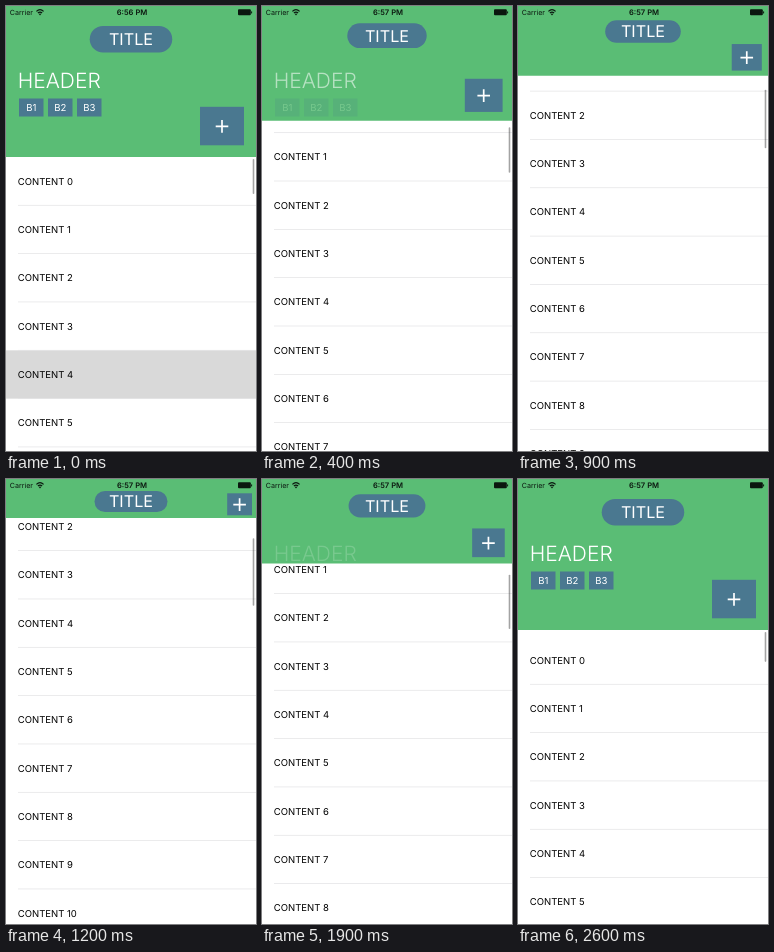
These frames come from a looping animation (250 by 445 pixels, 2700 ms). An HTML page:

```html
<!DOCTYPE html>
<html lang="en">
<head>
<meta charset="utf-8">
<title>Collapsing header</title>
<style>
  html, body { margin: 0; width: 100%; height: 100%; overflow: hidden; background: #fff; }
  svg { display: block; }
  text { font-family: Inter, Roboto, sans-serif; text-rendering: geometricPrecision; }
  .mid { text-anchor: middle; }
  .light { fill: #fff; }
  .blue { fill: #4a7890; }
  .row { font-size: 9.5px; }
  .line { fill: #e2e2e4; }
</style>
</head>
<body>
<svg width="250" height="445" viewBox="0 0 250 445">
  <rect width="250" height="445" fill="#fff"/>
  <g id="rows"></g>
  <rect id="bar" x="246.7" width="1.6" rx=".8" fill="#000" fill-opacity=".36"/>
  <svg id="head" width="250" height="151">
    <rect width="250" height="151" fill="#5abd75"/>
    <text id="header" class="light" x="11.7" y="82.2" font-size="21" font-weight="350">HEADER</text>
    <g id="tabs"></g>
    <rect id="pill" class="blue"/>
    <text id="title" class="light mid" x="125" font-size="16.2">TITLE</text>
    <rect id="add" class="blue"/>
    <path id="plus" d="M-6.3 0H6.3M0-6.3V6.3" stroke="#fff" stroke-width="1.7"/>
  </svg>
  <g id="status" fill="#0b170f">
    <text x="3.8" y="9" font-size="7.1">Carrier</text>
    <g fill="none" stroke="#0b170f" stroke-width="1.2">
      <path d="M30.4 5.4Q34 2 37.6 5.4M31.9 7Q34 5.1 36.1 7"/>
    </g>
    <path d="M32.8 8.1Q34 7.1 35.2 8.1L34 9.4Z"/>
    <text id="clock" class="mid" x="126" y="9.1" font-size="7.6" font-weight="600">6:56 PM</text>
    <rect x="232" y="3.3" width="12.8" height="6" rx="1"/>
    <rect x="245.1" y="5.2" width="1" height="2.2" rx=".5"/>
  </g>
</svg>
<script>
const LOOP = 2700, STEP = 100;
const ROW = 48.33, TOP = 151, TRAVEL = 224;

// [time in ms, scroll offset in px]
const drag = [[0, 0], [400, 72.6], [900, 162.5], [1200, 224.3], [1350, 239],
              [1900, 133], [2300, 51.5], [2600, -6]];

const $ = id => document.getElementById(id);
const mix = (a, b, p) => a + (b - a) * p;
const clamp = v => Math.min(1, Math.max(0, v));

function set(el, attrs) {
  for (const k in attrs) el.setAttribute(k, attrs[k]);
  return el;
}

function add(parent, tag, attrs, text = '') {
  const el = set(document.createElementNS('http://www.w3.org/2000/svg', tag), attrs);
  el.textContent = text;
  return parent.appendChild(el);
}

const pressed = add($('rows'), 'rect', { y: 4 * ROW, width: 250, height: ROW, fill: '#d9d9d9' });
for (let i = 0; i < 14; i++) {
  add($('rows'), 'text', { class: 'row', x: 11.8, y: (i + .5) * ROW + 3.5 }, 'CONTENT ' + i);
  add($('rows'), 'rect', { class: 'line', x: 12, y: (i + 1) * ROW - .4, width: 238, height: .7 });
}
for (let i = 0; i < 3; i++) {
  const x = 13 + i * 29;
  add($('tabs'), 'rect', { class: 'blue', x, y: 92.5, width: 24.5, height: 18 });
  add($('tabs'), 'text', { class: 'light mid', x: x + 12.25, y: 105, 'font-size': 9.6 }, 'B' + (i + 1));
}

const slope = (a, b) => (b[1] - a[1]) / (b[0] - a[0]);

function tangent(i) {
  const last = drag.length - 1;
  if (i === 0) return slope(drag[0], drag[1]);
  if (i === last) return slope(drag[last - 1], drag[last]);
  const a = slope(drag[i - 1], drag[i]), b = slope(drag[i], drag[i + 1]);
  return a * b > 0 ? (a + b) / 2 : 0;
}

// Cubic Hermite curve through the drag points
function scrollAt(t) {
  let i = 0;
  while (i < drag.length - 2 && t > drag[i + 1][0]) i++;
  const [t0, a] = drag[i], [t1, b] = drag[i + 1];
  const d = t1 - t0, u = (t - t0) / d, v = 1 - u;
  return v * v * (1 + 2 * u) * a + u * u * (3 - 2 * u) * b
       + u * v * d * (v * tangent(i) - u * tangent(i + 1));
}

function draw(t) {
  const s = scrollAt(t), p = clamp(s / TRAVEL), down = Math.max(0, s);
  const h = TOP - p * TRAVEL / 2;

  set($('rows'), { transform: `translate(0 ${TOP - s})` });
  set(pressed, { visibility: t < STEP ? 'visible' : 'hidden' });
  set($('head'), { height: h });
  set($('header'), { opacity: clamp(1 - s / 163) });
  set($('tabs'), { opacity: clamp(1 - s / 87) });

  const pw = mix(82.5, 73, p), ph = mix(26.5, 21, p), cy = mix(33.2, 22.5, p);
  set($('pill'), { x: 125 - pw / 2, y: cy - ph / 2, width: pw, height: ph, rx: ph / 2 });
  set($('title'), { y: cy + 5.9 });

  const w = mix(44, 24.8, p), bh = mix(38.5, 22, p);
  const x = 250 - mix(12, 4, p) - w, y = h - mix(11.7, 2.7, p) - bh;
  set($('add'), { x, y, width: w, height: bh });
  set($('plus'), { transform: `translate(${x + w / 2} ${y + bh / 2 + .3})` });

  set($('bar'), {
    y: h + 2 + .052 * down + .00013 * down * down,
    height: 35 + (s < 0 ? .85 : .145) * s
  });
  $('clock').textContent = t < STEP ? '6:56 PM' : '6:57 PM';
}

const start = performance.now();
function tick() {
  const t = (performance.now() - start) % LOOP;
  draw(Math.floor(t / STEP) * STEP);
  requestAnimationFrame(tick);
}
tick();
</script>
</body>
</html>
```
